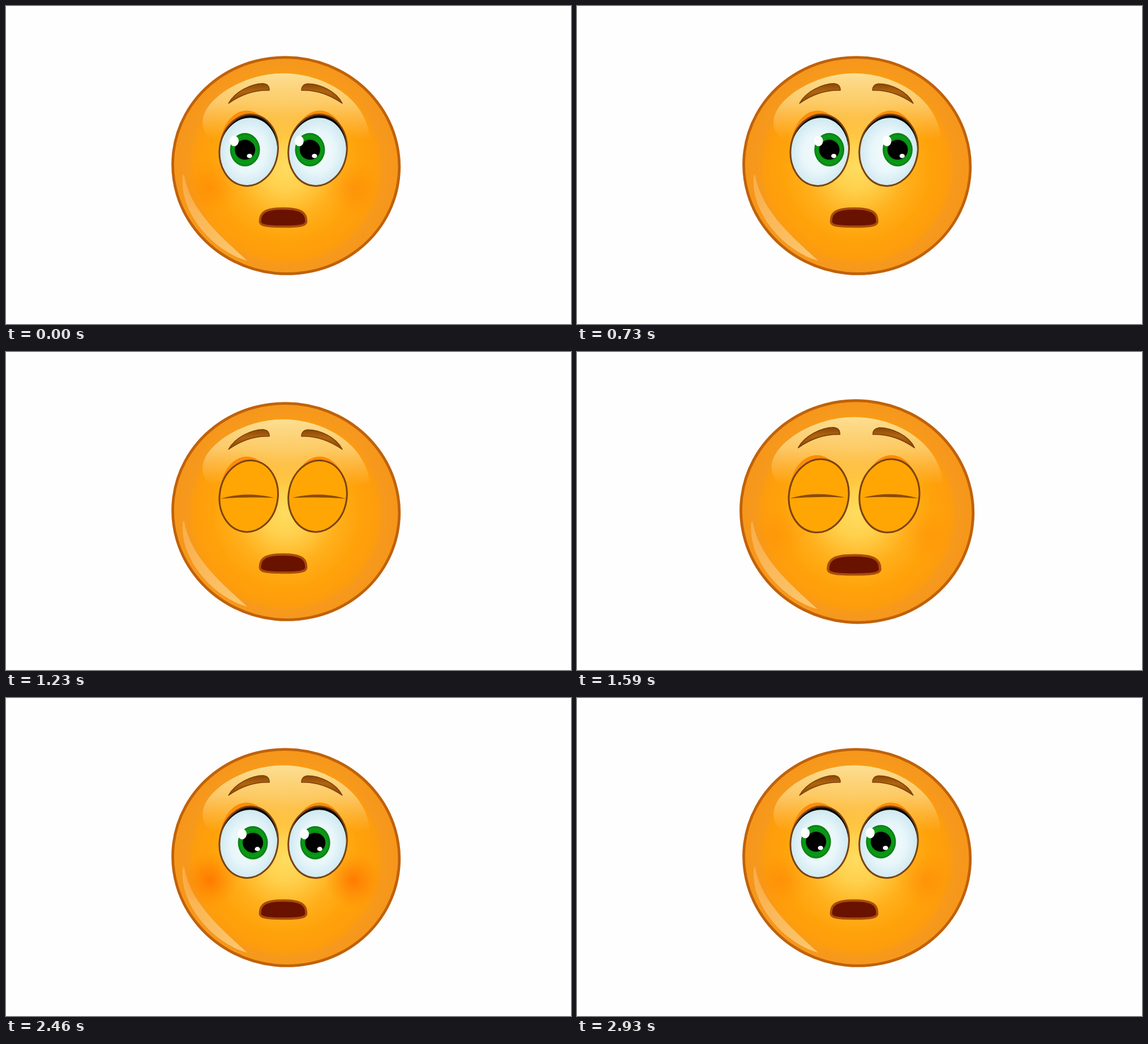
An HTML page that plays this animation: 998x561 px, repeating every 2.96 s.

```html
<!DOCTYPE html>
<html lang="en">
<head>
<meta charset="utf-8">
<title>Blushing face</title>
<style>
  html, body { margin: 0; width: 100%; height: 100%; overflow: hidden; background: #fefefe; }
  svg { display: block; width: 998px; height: 561px; }
</style>
</head>
<body>
<svg viewBox="0 0 1000 562">
  <defs>
    <radialGradient id="skin" gradientUnits="userSpaceOnUse" cx="0" cy="3" r="202">
      <stop offset="0" stop-color="#ffdc60"/>
      <stop offset=".2" stop-color="#ffd04c"/>
      <stop offset=".45" stop-color="#ffb01c"/>
      <stop offset=".65" stop-color="#ffa20a"/>
      <stop offset=".8" stop-color="#fe9d0c"/>
      <stop offset=".86" stop-color="#f6991c"/>
      <stop offset="1" stop-color="#f6961a"/>
    </radialGradient>
    <linearGradient id="shine" gradientUnits="userSpaceOnUse" x1="0" y1="119" x2="0" y2="236">
      <stop offset="0" stop-color="#fce29a" stop-opacity=".95"/>
      <stop offset=".45" stop-color="#fcdc8c" stop-opacity=".7"/>
      <stop offset="1" stop-color="#fcd480" stop-opacity="0"/>
    </linearGradient>
    <linearGradient id="sheen" x1="0" y1="0" x2=".7" y2="1">
      <stop offset="0" stop-color="#fcc070" stop-opacity=".55"/>
      <stop offset="1" stop-color="#fdd080" stop-opacity=".8"/>
    </linearGradient>
    <linearGradient id="brow" x1="0" y1="0" x2="0" y2="1">
      <stop offset="0" stop-color="#8a4806"/>
      <stop offset=".4" stop-color="#b0640f"/>
      <stop offset="1" stop-color="#8a4806"/>
    </linearGradient>
    <radialGradient id="white">
      <stop offset="0" stop-color="#f6fcfd"/>
      <stop offset=".6" stop-color="#e8f6fa"/>
      <stop offset="1" stop-color="#cfe9f1"/>
    </radialGradient>
    <radialGradient id="iris">
      <stop offset=".6" stop-color="#0a8a14"/>
      <stop offset=".82" stop-color="#0a9c16"/>
      <stop offset="1" stop-color="#077a12"/>
    </radialGradient>
    <radialGradient id="blush">
      <stop offset="0" stop-color="#ff7200" stop-opacity=".85"/>
      <stop offset=".4" stop-color="#ff7a00" stop-opacity=".55"/>
      <stop offset="1" stop-color="#ff8a00" stop-opacity="0"/>
    </radialGradient>
    <clipPath id="socket"><ellipse rx="51.5" ry="63" transform="rotate(9)"/></clipPath>
  </defs>
  <g id="face">
    <ellipse rx="200.6" ry="191.2" transform="translate(495.6 282) rotate(6)" fill="url(#skin)" stroke="#c0620a" stroke-width="4.8"/>
    <path d="M348 205C348 165 420 119 490 119C565 119 640 165 644 236H366Q348 226 348 205Z" fill="url(#shine)"/>
    <path d="M315 298C326 360 375 403 427 450C368 434 306 366 313 300Z" fill="url(#sheen)"/>
    <g id="cheeks" fill="url(#blush)">
      <circle cx="361" cy="321" r="50"/>
      <circle cx="615" cy="322" r="50"/>
    </g>
    <g fill="url(#brow)" stroke="#7c4008" stroke-width="1.6" stroke-linejoin="round">
      <path d="M394 172C405 151 435 137 455 137Q466 138 466 149C440 148 415 157 394 172Z"/>
      <path d="M595 172C585 151 555 137 533 137.5Q523 139 523 149C550 148 575 158 595 172Z"/>
    </g>
    <g id="eyes"></g>
    <path id="mouth" d="M-41 7C-41-9-32-16 0-16C32-16 41-9 41 7C41 14 30 16 0 16C-30 16-41 14-41 7Z" fill="#6a1200" stroke="#a84c0a" stroke-width="4"/>
  </g>
</svg>
<script>
const LOOP = 2960;
const $ = id => document.getElementById(id);
const mix = (a, b, k) => a + (b - a) * k;

// dir: -1 for the left eye, 1 for the right one
function eye(x, dir) {
  return `<g class="eye" transform="translate(${x} 254.8)">
    <ellipse cx="${dir * 3.5}" cy="-9" rx="46" ry="61" fill="#ff8c06"/>
    <g clip-path="url(#socket)">
      <ellipse rx="52" ry="64" transform="rotate(9)" fill="#0c0600"/>
      <ellipse cy="3.5" rx="51" ry="61" transform="rotate(9)" fill="url(#white)"/>
      <g class="ball">
        <ellipse rx="26.5" ry="29.5" fill="url(#iris)"/>
        <ellipse rx="18" ry="17.5"/>
        <ellipse cx="-19" cy="-15.5" rx="7.8" ry="9.3" fill="#fff"/>
        <ellipse cx="8" cy="11" rx="4.6" ry="3.8" fill="#fff"/>
      </g>
      <rect class="lid" x="-60" y="-70" width="120" height="70" fill="#ffa604"/>
      <rect class="lid" x="-60" width="120" height="70" fill="#ffa604"/>
    </g>
    <ellipse rx="51.5" ry="63.4" transform="rotate(9)" fill="none" stroke="#7c4210" stroke-width="3"/>
    <path class="seam" transform="scale(${-dir} 1)" d="M-50 4.5Q-4-9.5 45 3Q-4 .5-50 4.5Z" fill="#8a4a08"/>
  </g>`;
}
$("eyes").innerHTML = eye(429.6, -1) + eye(551.6, 1);
const eyes = [...document.querySelectorAll(".eye")].map(el => ({
  ball: el.querySelector(".ball"),
  lids: el.querySelectorAll(".lid"),
  seam: el.querySelector(".seam")
}));

// Gaze as x offsets of the left and right iris, then their shared y
const START = [-6.6, -13.6, -.8], RIGHT = [20.2, 19.2, -.8],
      LEFT = [-12.6, -13.6, -.8], AHEAD = [8.4, -3.6, 1.2];

function draw(t) {
  // n equal steps, the first taken at a and the last at b
  const steps = (a, b, n) =>
    Math.max(0, Math.min(n, Math.floor((t - a) / (b - a) * (n - 1) + 1.001))) / n;

  const move = (from, to, k) => from.map((v, i) => mix(v, to[i], k));
  const gaze = t < 730 ? move(START, RIGHT, steps(30, 330, 10))
    : t < 1460 ? move(RIGHT, LEFT, steps(730, 1030, 10))
    : move(AHEAD, START, steps(2460, 2930, 15));

  const shut = t < 1460 ? steps(1190, 1230, 2) : 1 - steps(1727, 1760, 2);
  const puff = Math.max(0, 1 - Math.abs(t - 1660) / 200);
  const blush = t < 1460 ? .4 * (1 - steps(30, 330, 10))
    : t < 2460 ? Math.min(1, (t - 1460) / 600)
    : mix(1, .4, steps(2460, 2930, 15));

  eyes.forEach(({ ball, lids, seam }, i) => {
    ball.setAttribute("transform", `translate(${gaze[i]} ${gaze[2]})`);
    lids.forEach((lid, j) => {
      const y = (j ? 1 : -1) * 66 * (1 - shut) + 1;
      lid.setAttribute("transform", `translate(0 ${y})`);
      lid.setAttribute("visibility", shut ? "visible" : "hidden");
      lid.setAttribute("stroke", shut < 1 ? "#7c4210" : "#ffa604");
      lid.setAttribute("stroke-width", 2);
    });
    seam.setAttribute("visibility", shut === 1 ? "visible" : "hidden");
  });
  $("cheeks").setAttribute("opacity", blush);
  $("face").setAttribute("transform",
    `translate(495.5 282) scale(${1 + .038 * puff}) translate(-495.5 -282)`);
  $("mouth").setAttribute("transform",
    `translate(490.5 374) scale(${1 + .15 * puff} ${1 + .05 * puff})`);
}

const start = performance.now();
function tick() {
  draw((performance.now() - start) % LOOP);
  requestAnimationFrame(tick);
}
tick();
</script>
</body>
</html>
```
